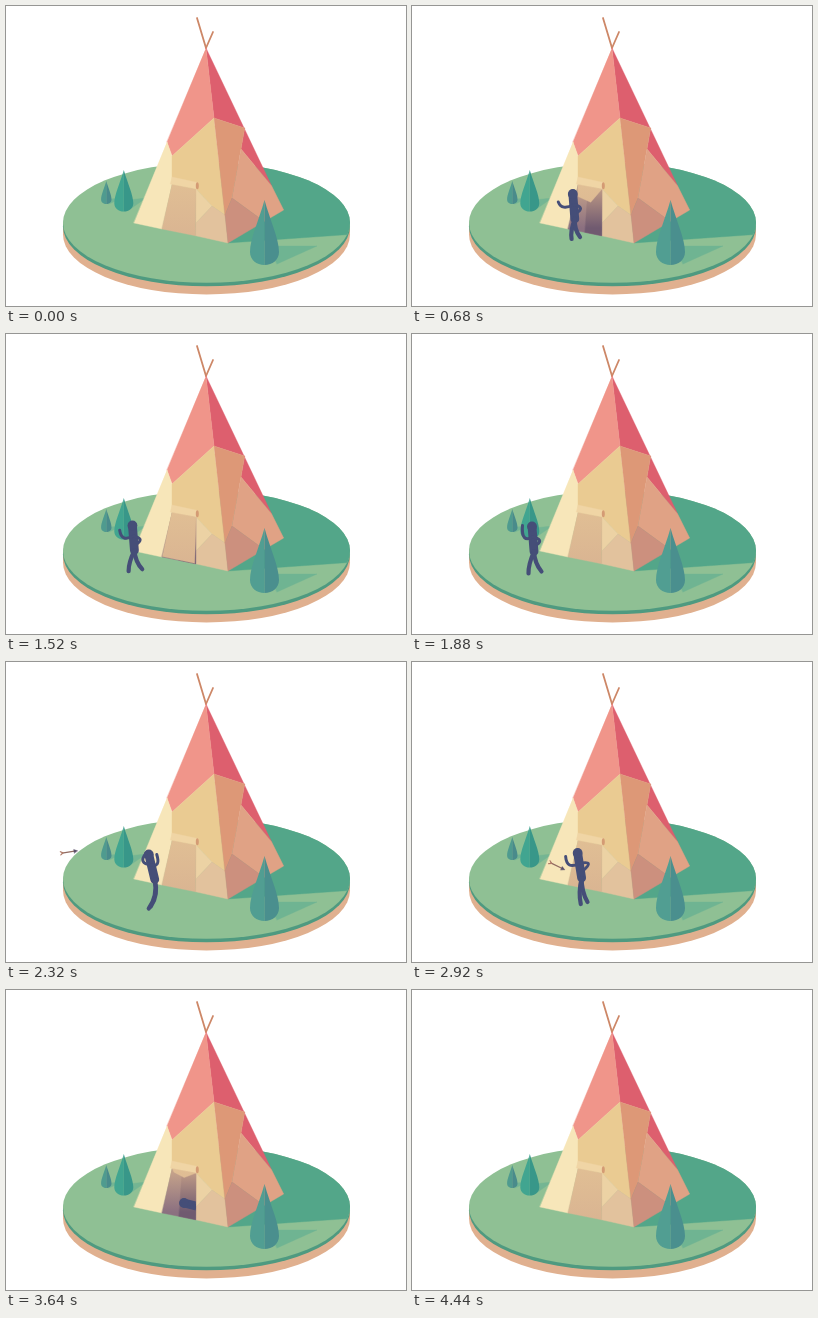
Recreate the animation shown at these times as an HTML page with a canvas. Size 400 by 300 pixels, loop 5340 ms.

```html
<!DOCTYPE html>
<html lang="en">
<head>
<meta charset="utf-8">
<title>Tent</title>
<style>
html, body { margin: 0; width: 100%; height: 100%; overflow: hidden; background: #fff; }
canvas { display: block; width: 400px; height: 300px; }
</style>
</head>
<body>
<canvas id="stage" width="400" height="300"></canvas>
<script>
const c = document.getElementById('stage').getContext('2d');
const LOOP = 5340, STEP = 40, START = 200, END = 4440;
const INK = '#454e78', TAN = '#e0b08f';
const DISC = { x: 200.5, y: 216.8, rx: 143.5, ry: 60 };

// Corners shared by the tent's panels
const apex = [200, 42], ridge = [208, 112], front = [222, 237], seam = [219, 209];
const left = [128, 217], leftTop = [161, 136], leftFold = [166, 150];
const right = [277.7, 204], rightTop = [238.7, 122], rightMid = [265.7, 180];
const fold = [235, 143], notch = [226, 192], peak = [206, 200];
const doorA = [166, 178], doorB = [190, 183], doorC = [189.7, 229.8], doorD = [156, 223];

const clamp = v => Math.max(0, Math.min(1, v));
const mix = (a, b, p) => a + (b - a) * p;
const mid = (a, b, p = .5) => [mix(a[0], b[0], p), mix(a[1], b[1], p)];

function ramp(t, from, to) {
  const p = clamp((t - from) / (to - from));
  return p * p * (3 - 2 * p);
}

function path(...pts) {
  c.beginPath();
  pts.forEach(p => c.lineTo(...p));
}

function poly(fill, ...pts) {
  path(...pts);
  c.closePath();
  c.fillStyle = c.strokeStyle = fill;
  c.lineWidth = .4;
  c.fill();
  c.stroke();
}

function line(color, width, ...pts) {
  path(...pts);
  c.strokeStyle = color;
  c.lineWidth = width;
  c.stroke();
}

function oval(fill, x, y, rx, ry) {
  c.beginPath();
  c.ellipse(x, y, rx, ry, 0, 0, 7);
  c.fillStyle = fill;
  c.fill();
}

function fade(y0, y1, from, to) {
  const g = c.createLinearGradient(0, y0, 0, y1);
  g.addColorStop(0, from);
  g.addColorStop(1, to);
  return g;
}

function tree(x, top, w, h, light, dark) {
  const wide = top + h * .8, base = top + h;
  for (const [s, fill] of [[-w, light], [w, dark]]) {
    c.beginPath();
    c.moveTo(x, top);
    c.bezierCurveTo(x + s * .4, top + h * .32, x + s, top + h * .6, x + s, wide);
    c.bezierCurveTo(x + s, wide + h * .12, x + s * .55, base, x, base);
    c.fillStyle = fill;
    c.fill();
  }
}

function ground() {
  const { x, y, rx, ry } = DISC;
  const layer = (fill, drop) => oval(fill, x, y + drop, rx, ry);
  layer(TAN, 11.7);
  c.fillRect(x - rx, y, rx * 2, 11.7);
  layer('#4f9a80', 3.5);
  layer('#8fc094', 0);
  c.save();
  c.clip();
  poly('#53a689', [215, 150], [400, 150], [400, 224], [343, 228.5], front);
  c.restore();
  poly('#6fb492', [262, 240], [311, 240], [271, 258]);
  poly('#74b593', [104, 193], [116, 192], [103, 198]);
  poly('#74b593', [122, 194], [140, 192], [123, 204]);
}

function tent() {
  line('#cd8767', 1.8, [191, 12], apex);
  line('#cd8767', 1.8, [207, 26], apex);
  poly('#dd5f6e', apex, rightMid, fold, rightTop, ridge);
  poly('#f0958a', apex, ridge, leftFold, leftTop);
  poly('#f7e6b9', leftTop, leftFold, doorA, doorD, left);
  poly('#eacb92', ridge, leftFold, doorA, doorB, peak, seam);
  poly('#ecd2a4', doorB, peak, [190, 217]);
  poly('#e2c29d', [190, 217], peak, seam, front, doorC);
  poly('#dd9877', ridge, rightTop, fold, notch, seam);
  poly('#e0a285', fold, rightMid, right, mid(right, front, .35), notch);
  poly('#cc907e', notch, mid(right, front, .35), front, seam);
}

function inside() {
  poly(fade(182, 222, '#c5a28a', '#8b7080'), doorA, doorB, doorC, doorD);
  poly(fade(182, 222, '#c09b86', '#705a70'), [176, 180], doorB, doorC, [173, 226.3]);
}

// Lifts open, then falls shut in shrinking bounces
function swing(t, open, close, top) {
  const u = Math.max(0, t - close), life = clamp(1 - u / 840);
  return top * ramp(t, open, open + 320) * life * life * Math.abs(Math.cos(u * .004));
}

function flap(angle) {
  const drop = Math.cos(angle), out = Math.sin(angle);
  const hang = (hinge, end, shift) => [
    mix(hinge[0], end[0], drop) + shift * out, mix(hinge[1], end[1], drop) - 4 * out
  ];
  poly(fade(180, 228, '#e0be94', '#dab592'), doorA, doorB,
    hang(doorB, doorC, -12), hang(doorA, doorD, 4));
}

function roll() {
  poly('#f0d5a5', [166, 171], [191.5, 176.5], [191, 183], [164.5, 178]);
  oval('#d49b74', 191.3, 179.8, 1.5, 3.5);
}

// Out of the door, on to the left, dash back, creep to the arrow, go in
const manX = t => 190 - 42 * ramp(t, 300, 900) - 28 * ramp(t, 1120, 1700)
  + 57 * ramp(t, 2160, 2530) - 20 * ramp(t, 2680, 3120)
  + 21 * ramp(t, 3160, 3480) + 22 * ramp(t, 3640, 3880);

function figureAt(t) {
  const x = manX(t);
  const crouch = 1 - ramp(t, 300, 640) + ramp(t, 3280, 3520);
  const panic = ramp(t, 2160, 2300) - ramp(t, 2360, 2560);
  const alert = ramp(t, 2400, 2900) - ramp(t, 3160, 3400);
  const raise = ramp(t, 1400, 1700) - .5 * ramp(t, 2400, 2900);
  const gait = (x - manX(t - STEP)) * .6 * Math.sin(t / 60) * (1 - panic);
  const y = 188 + 4.5 * ramp(t, 1120, 1700) - 1.5 * ramp(t, 2400, 2900) + 22 * crouch;

  // Crouching folds the body sideways behind the head
  const at = (dx, dy) => [
    x + dx * (1 - .7 * crouch) + .45 * dy * crouch, y + dy * (1 - .88 * crouch)
  ];
  const head = at(0, 0), hip = at(2 + 4 * panic + 2 * alert, 25);
  const reach = 45 + 9 * panic + 5 * alert + 2 * raise * (1 - panic);
  const leg = (dx, dy) => {
    const foot = at(dx, dy), knee = mid(hip, foot);
    return [hip, [knee[0] - 3 + 9 * panic, knee[1] + 2], foot];
  };
  const shoulder = mid(head, hip, .42);
  const hand = at(-14.5 + 5 * raise + 6.5 * panic, 8 - 9 * raise);
  return {
    head, hip, hand,
    arms: [
      [shoulder, at(-11, 17 - 8 * panic), hand],
      [shoulder, at(12 + 6 * alert, 13 - 6 * alert), at(5 + 3 * panic, 18 - 18 * panic)]
    ],
    legs: [
      leg(-3.5 + 3.5 * panic + 5 * alert + gait, reach),
      leg(9.5 - 7.5 * panic + 2 * alert - gait, reach - 2)
    ]
  };
}

function limb([from, joint, to], width) {
  c.beginPath();
  c.moveTo(...from);
  c.quadraticCurveTo(...joint, ...to);
  c.strokeStyle = INK;
  c.lineWidth = width;
  c.stroke();
}

function figure({ head, hip, arms, legs }) {
  line(INK, 8.8, head, hip);
  oval(INK, ...head, 4.9, 5);
  arms.forEach(arm => limb(arm, 3));
  legs.forEach(leg => limb(leg, 4.2));
}

// Flies in a shallow arc, quivers in the tent wall, then leaves in the hand
function arrow(t, man) {
  if (t < 2280 || t >= 3520) return;
  const d = Math.min(82, (t - 2320) * 17.5 / STEP), rest = Math.max(0, t - 2510);
  const spot = [63 + d, 190 - .15 * d + .0039 * d * d];
  c.save();
  c.translate(...mid(spot, man.hand, ramp(t, 3000, 3120)));
  c.rotate(Math.atan(-.15 + .0078 * d) + .25 * Math.exp(-rest / 90) * Math.sin(rest / 18));
  line('#916b62', 1.2, [-7, 0], [7, 0]);
  line('#b07a68', 1.2, [-8.5, -1.6], [-6, 0], [-8.5, 1.6]);
  poly('#5b506a', [8.5, 0], [5, -1.8], [5, 1.8]);
  c.restore();
}

function draw(t) {
  c.clearRect(0, 0, 400, 300);
  c.lineCap = c.lineJoin = 'round';
  ground();
  tree(100.3, 175, 5.2, 23, '#4f9b8f', '#498b8b');
  tree(117.8, 164, 9.5, 41.5, '#41a590', '#389789');
  tent();

  const angle = swing(t, 160, 1000, 1.2) + swing(t, 3080, 3600, 1.55);
  const man = figureAt(t), indoors = t < 560 || t > 3440;
  const actors = () => { figure(man); arrow(t, man); };
  if (angle > .01) {
    inside();
    if (indoors) {
      c.save();
      path(doorA, doorB, doorC, doorD);
      c.clip();
      actors();
      c.restore();
    }
  }
  flap(angle);
  roll();
  if (!indoors) actors();
  tree(258.5, 194, 14.5, 65, '#519e92', '#4a8f8e');
}

const begin = performance.now();
function tick() {
  const t = Math.max(0, performance.now() - begin) % LOOP;
  draw(t < START ? 0 : Math.min(END, Math.floor(t / STEP) * STEP));
  requestAnimationFrame(tick);
}
tick();
</script>
</body>
</html>
```
